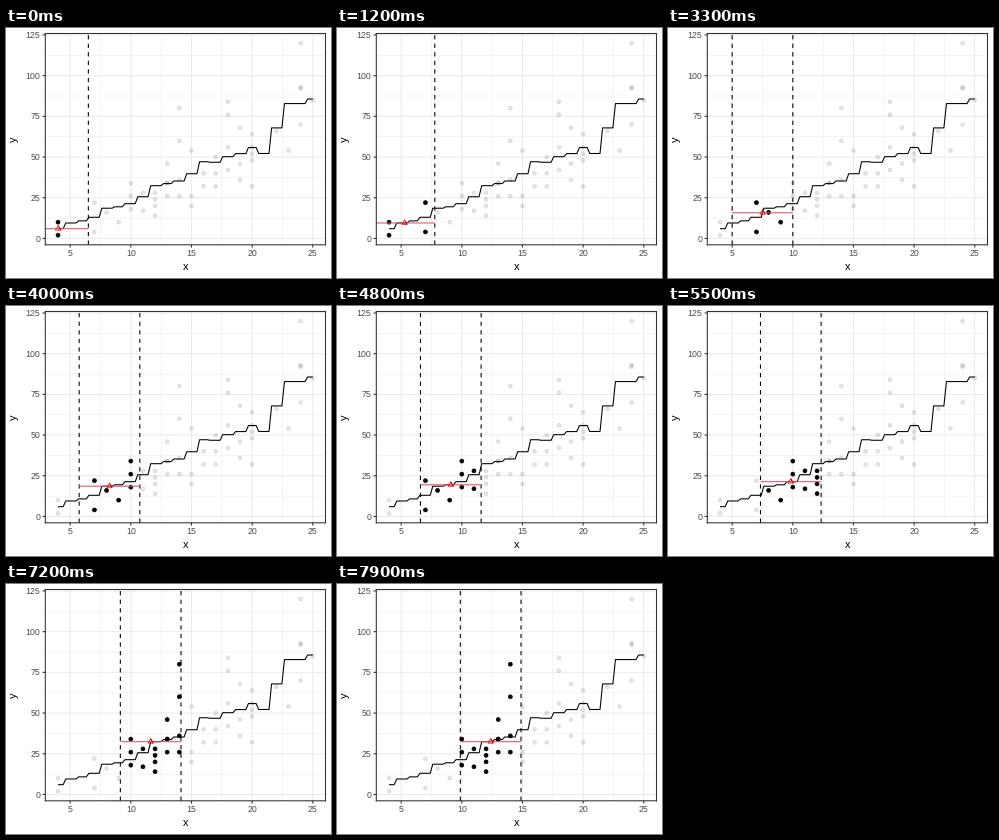
These frames come from a looping animation (325 by 250 pixels, 8 s). A matplotlib script:

```python
import numpy as np
import matplotlib.pyplot as plt
from matplotlib.animation import FuncAnimation

plt.rcParams["font.family"] = "Liberation Sans"

W, H, DPI = 325, 250, 100
PX = 72 / DPI  # points per pixel
LEFT, RIGHT, TOP, BOTTOM = 39.3, 319.5, 5.5, 216.8
X0, X1, Y0, Y1 = 2.95, 26.05, -3.9, 125.9
FRAMES, INTERVAL = 80, 100
HALF = 2.5
LINE = 1.07 * PX
SX, SY = (RIGHT - LEFT) / (X1 - X0), (BOTTOM - TOP) / (Y1 - Y0)

# Stopping distances by speed
dist = {
    4: [2, 10], 7: [4, 22], 8: [16], 9: [10], 10: [18, 26, 34], 11: [17, 28],
    12: [14, 20, 24, 28], 13: [26, 34, 34, 46], 14: [26, 36, 60, 80],
    15: [20, 26, 54], 16: [32, 40], 17: [32, 40, 50], 18: [42, 56, 76, 84],
    19: [36, 46, 68], 20: [32, 48, 52, 56, 64], 22: [66], 23: [54],
    24: [70, 92, 93, 120], 25: [85],
}
xs, ys = np.array([(x, y) for x, vals in dist.items() for y in vals], float).T

# Box kernel smoother on an even grid
grid = np.linspace(xs.min(), xs.max(), 100)
inside = np.abs(xs - grid[:, None]) <= HALF
smooth = (inside * ys).sum(axis=1) / inside.sum(axis=1)

fig = plt.figure(figsize=(W / DPI, H / DPI), dpi=DPI, facecolor="white")
ax = fig.add_axes([LEFT / W, 1 - BOTTOM / H, (RIGHT - LEFT) / W, (BOTTOM - TOP) / H])
ax.set(xlim=(X0, X1), ylim=(Y0, Y1), xticks=[], yticks=[])
for spine in ax.spines.values():
    spine.set(color="#333333", linewidth=LINE, snap=False, zorder=10)


def stroke(x, y, color, width=LINE, **kw):
    return ax.plot(x, y, color=color, lw=width, snap=False,
                   solid_capstyle="butt", dash_capstyle="butt", **kw)[0]


def label(x, y, text, size, color, **kw):
    fig.text(x / W, 1 - y / H, text, size=size * PX, color=color, **kw)


def px_x(x):
    return LEFT + (x - X0) * SX


def px_y(y):
    return BOTTOM - (y - Y0) * SY


# Grid, ticks and labels
for width, first_x, first_y in ((LINE / 2, 7.5, 12.5), (LINE, 5, 0)):
    for x in np.arange(first_x, X1, 5):
        stroke([x, x], [Y0, Y1], "#EBEBEB", width, zorder=1)
    for y in np.arange(first_y, Y1, 25):
        stroke([X0, X1], [y, y], "#EBEBEB", width, zorder=1)

for x in range(5, 26, 5):
    stroke([x, x], [Y0, Y0 - 2.75 / SY], "#333333", clip_on=False, zorder=9)
    label(px_x(x), 228.1, str(x), 8.8, "#4D4D4D", ha="center", va="baseline")
for y in range(0, 126, 25):
    stroke([X0, X0 - 2.75 / SX], [y, y], "#333333", clip_on=False, zorder=9)
    label(34.3, px_y(y) + 3.1, str(y), 8.8, "#4D4D4D", ha="right", va="baseline")
label((LEFT + RIGHT) / 2, 242, "x", 11, "black", ha="center", va="baseline")
label(13.4, (TOP + BOTTOM) / 2, "y", 11, "black", rotation=90,
      ha="right", va="center", rotation_mode="default")

# Data layers
dots = ax.scatter(xs, ys, s=(3.9 * PX) ** 2, linewidths=0.71 * PX,
                  c=np.zeros((len(xs), 4)), zorder=3)
stroke(grid, smooth, "black", zorder=4, solid_joinstyle="round")
edges = [stroke([0, 0], [Y0, Y1], "black", zorder=5, dashes=(4, 4)) for _ in range(2)]
mean_line = stroke([], [], "#DF536B", zorder=6)
marker = stroke([], [], "red", 0.71 * PX, zorder=7)
tri_x = np.array([0, 2.63, -2.63, 0, 2.63]) / SX
tri_y = np.array([3.03, -1.52, -1.52, 3.03, -1.52]) / SY


def update(frame):
    state = frame / 2
    k = int(state)
    x = np.interp(state, range(len(grid)), grid)
    y = np.interp(state, range(len(grid)), smooth)
    rgba = np.zeros((len(xs), 4))
    rgba[:, 3] = np.where(inside[k], 1, 0.1)
    dots.set_facecolor(rgba)
    dots.set_edgecolor(rgba)
    for edge, side in zip(edges, (-HALF, HALF)):
        edge.set_xdata([x + side] * 2)
    mean_line.set_data([x - HALF, x + HALF], [y, y])
    marker.set_data(x + tri_x, y + tri_y)
    return [dots, mean_line, marker, *edges]


anim = FuncAnimation(fig, update, frames=FRAMES, interval=INTERVAL,
                     repeat=True, repeat_delay=0, blit=False)
plt.show()
```
